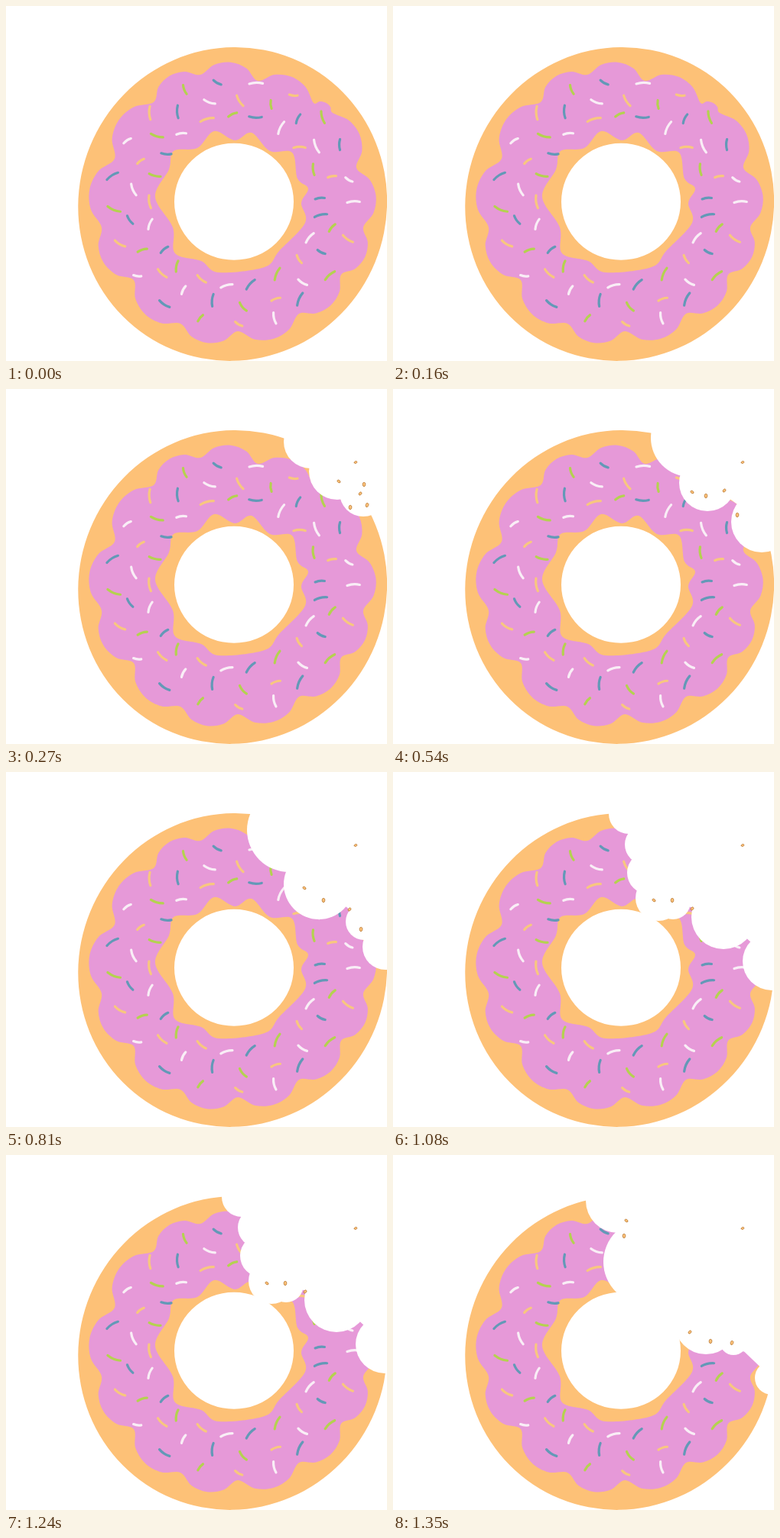
Write an HTML page with a canvas that moves like this. It is 498 px wide and 465 px high and loops after 1.62 s.

```html
<!DOCTYPE html>
<html lang="en">
<head>
<meta charset="utf-8">
<title>Donut</title>
<style>
html, body { margin: 0; width: 100%; height: 100%; overflow: hidden; background: #fff; }
canvas { display: block; }
</style>
</head>
<body>
<canvas id="stage" width="498" height="465"></canvas>
<script>
const ctx = document.getElementById('stage').getContext('2d');
const STEP = 270;
const CENTER = [297, 257];
const DOUGH = '#fdc177';
const ICING = '#e699d8';
const SPRINKLES = ['#f9eef6', '#6399b7', '#b4d24f', '#f8c77f'];

// Notches between the icing's scallops, and key points of its inner edge
const notches = [
  [329, 98], [402, 127], [427, 140], [458, 212], [467, 290], [438, 352], [383, 403],
  [303, 426], [228, 416], [167, 359], [125, 290], [142, 200], [193, 126], [254, 90]
];
const innerEdge = [
  [272, 164], [299, 176], [321, 166], [345, 190], [374, 192], [381, 226], [395, 239],
  [386, 258], [391, 284], [357, 321], [338, 342], [278, 349], [255, 334], [221, 324],
  [218, 290], [195, 250], [213, 214], [219, 190], [250, 186]
];

// Each bite is a chain of circles (x, y, radius) with a few crumbs (x, y)
const bites = [
  { circles: [], crumbs: [] },
  {
    circles: [[398, 69, 35], [433, 108, 37], [467, 136, 31]],
    crumbs: [[435, 121], [468, 125], [463, 137], [450, 155], [472, 152]]
  },
  {
    circles: [[388, 64, 51], [411, 123, 37], [482, 174, 40]],
    crumbs: [[391, 135], [409, 140], [433, 133], [450, 165]]
  },
  {
    circles: [[370, 76, 55], [409, 147, 46], [468, 196, 24], [496, 229, 30]],
    crumbs: [[390, 152], [415, 168], [449, 180], [464, 206]]
  },
  {
    circles: [[308, 55, 26], [329, 95, 26], [334, 132, 28], [347, 165, 30], [366, 170, 23],
      [432, 190, 42], [495, 248, 38]],
    crumbs: [[341, 168], [365, 168], [391, 179]]
  },
  {
    circles: [[294, 60, 42], [330, 140, 55], [360, 190, 40], [409, 220, 41], [445, 244, 18],
      [495, 292, 22]],
    crumbs: [[305, 86], [302, 106], [388, 232], [415, 244], [443, 246]]
  }
];

function seeded(seed) {
  return () => (seed = (seed * 16807) % 2147483647) / 2147483647;
}

// Round bumps between neighbouring notches, pushed away from the centre
function scallops(points) {
  return points.flatMap(([x, y], i) => {
    const [nx, ny] = points[(i + 1) % points.length];
    const dx = nx - x, dy = ny - y;
    return [0, .22, .5, .78].map(t => {
      const push = .27 * Math.sin(Math.PI * t) ** .7;
      return [x + dx * t + dy * push, y + dy * t - dx * push];
    });
  });
}

function smoothLoop(path, points) {
  const at = i => points[(i + points.length) % points.length];
  path.moveTo(...points[0]);
  points.forEach((b, i) => {
    const a = at(i - 1), c = at(i + 1), d = at(i + 2);
    path.bezierCurveTo(b[0] + (c[0] - a[0]) / 6, b[1] + (c[1] - a[1]) / 6,
      c[0] - (d[0] - b[0]) / 6, c[1] - (d[1] - b[1]) / 6, ...c);
  });
  path.closePath();
}

const dough = new Path2D();
dough.ellipse(296.2, 259.4, 201.2, 206.2, .39, 0, 7);
dough.closePath();
dough.ellipse(298, 256.3, 78, 76.5, 0, 0, 7);

const icing = new Path2D();
smoothLoop(icing, scallops(notches));
smoothLoop(icing, innerEdge);

// Sprinkles spread evenly over three rings, with jitter
function drawSprinkles() {
  const random = seeded(41), count = 62;
  ctx.lineCap = 'round';
  ctx.lineWidth = 3.2;
  for (let i = 0; i < count; i++) {
    const angle = (i + random() * .6) / count * 2 * Math.PI;
    const radius = [158, 112, 135][i % 3] + random() * 8 - 4;
    const tilt = random() * Math.PI;
    const half = 5 + random() * 4;
    ctx.save();
    ctx.translate(CENTER[0] + radius * Math.cos(angle), CENTER[1] + radius * Math.sin(angle));
    ctx.rotate(tilt);
    ctx.strokeStyle = SPRINKLES[i % 4];
    ctx.beginPath();
    ctx.moveTo(-half, 0);
    ctx.quadraticCurveTo(0, half * .3, half, 0);
    ctx.stroke();
    ctx.restore();
  }
}

function drawDonut() {
  ctx.fillStyle = DOUGH;
  ctx.fill(dough, 'evenodd');
  ctx.fillStyle = ICING;
  ctx.fill(icing, 'evenodd');
  drawSprinkles();
}

// Clears the circles and everything between their centres and the top right corner
function drawBite(circles) {
  ctx.fillStyle = '#fff';
  ctx.beginPath();
  ctx.moveTo(circles[0][0], 0);
  for (const [x, y] of circles) ctx.lineTo(x, y);
  ctx.lineTo(520, circles.at(-1)[1]);
  ctx.lineTo(520, 0);
  ctx.fill();
  for (const circle of circles) {
    ctx.beginPath();
    ctx.arc(...circle, 0, 7);
    ctx.fill();
  }
}

function drawCrumbs(crumbs) {
  const random = seeded(7);
  ctx.fillStyle = DOUGH;
  ctx.strokeStyle = '#b97d3c';
  ctx.lineWidth = .8;
  for (const [x, y] of crumbs) {
    const size = 2 + random();
    ctx.beginPath();
    ctx.ellipse(x, y, size, size * .7, random() * 3, 0, 7);
    ctx.fill();
    ctx.stroke();
  }
}

function render(time) {
  const { circles, crumbs } = bites[Math.floor(time / STEP) % bites.length];
  ctx.fillStyle = '#fff';
  ctx.fillRect(0, 0, 498, 465);
  drawDonut();
  if (circles.length) {
    drawBite(circles);
    drawCrumbs([[457, 96], ...crumbs]);
  }
}

const start = performance.now();
function tick() {
  render(performance.now() - start);
  requestAnimationFrame(tick);
}
tick();
</script>
</body>
</html>
```
